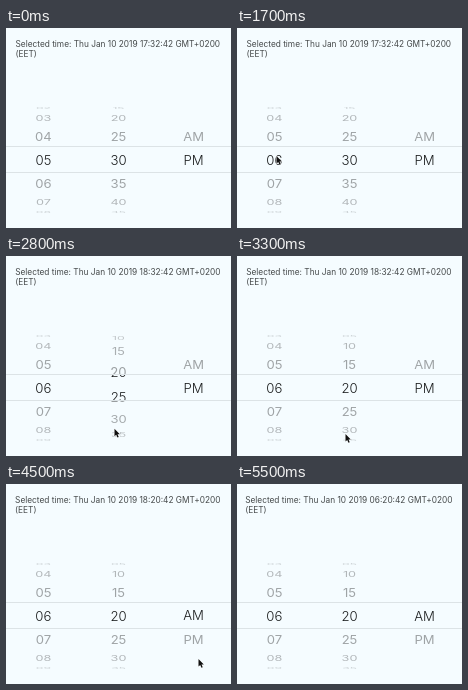
Recreate the animation shown at these times as an HTML page with a canvas. Size 225 px wide and 200 px high, loop 6.5 s.

```html
<!DOCTYPE html>
<html lang="en">
<head>
<meta charset="utf-8">
<title>Time picker</title>
<style>
  html, body { margin: 0; width: 100%; height: 100%; overflow: hidden; background: #f5fcff; }
  canvas { display: block; width: 225px; height: 200px; }
</style>
</head>
<body>
<canvas id="stage"></canvas>
<script>
const WIDTH = 225, HEIGHT = 200, LOOP = 6500, TICK = 100;
const CENTER = 132, BAND_TOP = 118.5, BAND_BOTTOM = 144.5;
const RADIUS = 52.7, ROW_ANGLE = 26.5 * Math.PI / 180;
const COMMIT_DELAY = 200;
const FONT = 'Inter, "Open Sans", sans-serif';

const canvas = document.getElementById('stage');
const ratio = window.devicePixelRatio || 1;
canvas.width = WIDTH * ratio;
canvas.height = HEIGHT * ratio;
const ctx = canvas.getContext('2d');
ctx.scale(ratio, ratio);

const pad = n => String(n).padStart(2, '0');
const progress = (t, start, end) => Math.min(1, Math.max(0, (t - start) / (end - start)));
const easeOut = (k, power) => 1 - (1 - k) ** power;
const mix = (a, b, k) => a + (b - a) * k;

// Each wheel turns once, from one row to another.
const hours = { from: 5, to: 6, start: 1000, end: 1600, label: i => pad((i + 11) % 12 + 1) };
const minutes = { from: 6, to: 4, start: 2600, end: 3400, label: i => pad(i * 5 % 60) };
const halves = { from: 1, to: 0, start: 4100, end: 4700, label: i => ['AM', 'PM'][i] };
const wheels = [hours, minutes, halves];

const wheelPosition = ({ from, to, start, end }, t) =>
  mix(from, to, easeOut(progress(t, start, end), 4));
const committedRow = ({ from, to, end }, t) => t < end + COMMIT_DELAY ? from : to;

// The pointer travels to each wheel, drags it, and leaves.
const pointerStart = { x: 70, y: 190 };
const pointerMoves = [
  { start: 400, end: 1000, x: 39.5, y: 157 },
  { start: 1000, end: 1400, x: 39.5, y: 128 },
  { start: 1700, end: 2200, x: 103.5, y: 110.5 },
  { start: 2200, end: 2500, x: 108.5, y: 131 },
  { start: 2600, end: 2900, x: 108.5, y: 178 },
  { start: 3800, end: 4100, x: 187, y: 150 },
  { start: 4100, end: 4500, x: 192.5, y: 175 },
  { start: 4600, end: 5200, x: 190, y: 181 }
];

function pointerAt(t) {
  return pointerMoves.reduce((at, { start, end, x, y }) => {
    const k = easeOut(progress(t, start, end), 2);
    return { x: mix(at.x, x, k), y: mix(at.y, y, k) };
  }, pointerStart);
}

function drawHeading(t) {
  const hour = committedRow(hours, t) % 12 + committedRow(halves, t) * 12;
  const minute = t < minutes.end + COMMIT_DELAY ? 32 : minutes.to * 5;
  const line = `Selected time: Thu Jan 10 2019 ${pad(hour)}:${pad(minute)}:42 GMT+0200`;
  ctx.font = `8.3px ${FONT}`;
  ctx.textAlign = 'left';
  ctx.fillStyle = '#444849';
  const left = 111.8 - ctx.measureText(line).width / 2;
  ctx.fillText(line, left, 18.5);
  ctx.fillText('(EET)', left, 28.5);
}

function drawRows(t, selected) {
  ctx.font = `${selected ? 300 : 400} 13.2px ${FONT}`;
  ctx.textAlign = 'center';
  ctx.fillStyle = selected ? '#1c1e1f' : '#000';
  wheels.forEach((wheel, column) => {
    const position = wheelPosition(wheel, t);
    for (let i = Math.ceil(position - 3.3); i <= position + 3.3; i++) {
      const text = wheel.label(i);
      if (!text) continue;
      const angle = (i - position) * ROW_ANGLE, flat = Math.cos(angle);
      ctx.save();
      ctx.translate(37.4 + 75.1 * column, CENTER + RADIUS * Math.sin(angle));
      ctx.scale(.9 + .1 * flat, flat);
      ctx.globalAlpha = selected ? 1 : .12 + .26 * flat;
      ctx.fillText(text, 0, 4.8);
      ctx.restore();
    }
  });
}

function clipped(bands, draw) {
  ctx.save();
  ctx.beginPath();
  for (const [top, bottom] of bands) ctx.rect(0, top, WIDTH, bottom - top);
  ctx.clip();
  draw();
  ctx.restore();
}

const arrow = new Path2D('M0 0V9.2L2.1 7.3L3.6 10.7L5.2 10L3.7 6.7H6.5Z');

function drawPointer(t) {
  if (t < 400 || t >= 5500) return;
  const { x, y } = pointerAt(t);
  ctx.save();
  ctx.translate(x, y);
  ctx.scale(.82, .82);
  ctx.lineWidth = 1;
  ctx.strokeStyle = '#fff';
  ctx.stroke(arrow);
  ctx.fillStyle = '#111';
  ctx.fill(arrow);
  ctx.restore();
}

function draw(t) {
  ctx.fillStyle = '#f5fcff';
  ctx.fillRect(0, 0, WIDTH, HEIGHT);
  drawHeading(t);
  clipped([[0, BAND_TOP], [BAND_BOTTOM, HEIGHT]], () => drawRows(t, false));
  clipped([[BAND_TOP, BAND_BOTTOM]], () => drawRows(t, true));
  ctx.fillStyle = '#dce3e6';
  ctx.fillRect(0, 118, WIDTH, 1);
  ctx.fillRect(0, 144, WIDTH, 1);
  drawPointer(t);
}

const start = performance.now();
function frame() {
  const t = (performance.now() - start) % LOOP;
  draw(Math.floor(t / TICK) * TICK);
  requestAnimationFrame(frame);
}
frame();
</script>
</body>
</html>
```
